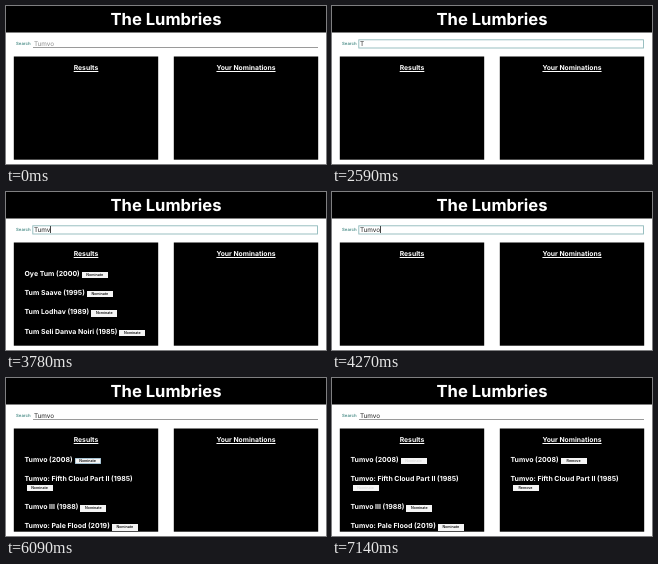
Animation of 320 by 158 pixels, one loop 8 s. Source, as an HTML page:

```html
<!DOCTYPE html>
<html lang="en">
<head>
<meta charset="utf-8">
<title>Nominations</title>
<style>
html, body { margin: 0; width: 100%; height: 100%; overflow: hidden; background: #fff; }
body {
  position: relative;
  font: 700 6.95px/8px Inter, "Liberation Sans", sans-serif;
  text-rendering: geometricPrecision;
  white-space: pre;
}
body > *, .panel > *, .field > * { position: absolute; box-sizing: border-box; }
svg { left: 0; top: 0; }
#box { fill: none; stroke: #8fb9bb; stroke-width: .9; }
#line { fill: #9a9a9a; }
header {
  left: 0; top: 0; width: 320px;
  color: #fff; font-size: 16.6px; line-height: 29px; text-align: center;
}
label { left: 10px; top: 34.5px; font-size: 4.3px; font-weight: 600; color: #4b8d88; }
.field {
  left: 27.5px; top: 34px; width: 284px; height: 8px;
  font-size: 6.4px; font-weight: 400; color: #222;
}
.field span { left: .4px; top: 0; }
.field.empty span { color: #8c8c8c; }
.field i { top: 0; width: .8px; height: 7px; background: #444; }
.panel { top: 50.5px; width: 144px; height: 103px; color: #fff; }
h2 {
  left: 0; top: 7.5px; width: 100%; margin: 0;
  font: inherit; font-size: 6.8px; text-align: center;
  text-decoration: underline; text-decoration-thickness: .7px; text-underline-offset: 1px;
}
.row { position: absolute; left: 10.5px; }
button {
  position: absolute; box-sizing: border-box; width: 26px; height: 6.5px;
  margin: 0; padding: 0; border: 0; background: #f5f5f5; color: #111;
  font: 600 3.6px/6.5px Inter, "Liberation Sans", sans-serif; text-align: center;
}
button:disabled { color: #d8d8d8; }
button.hot { box-shadow: inset 0 0 0 .7px #8fb4c8; }
</style>
</head>
<body>
<svg width="320" height="158">
  <rect width="320" height="26.5"/>
  <rect x="7.8" y="50.5" width="144.4" height="103.2"/>
  <rect x="167.8" y="50.5" width="144.4" height="103.2"/>
  <rect id="line" x="27" y="41" width="285" height="1"/>
  <rect id="box" x="26.8" y="33.8" width="284.7" height="8.2"/>
</svg>
<header>The Lumbries</header>
<label>Search</label>
<div class="field"><span></span><i></i></div>
<div class="panel" style="left:8px"><h2>Results</h2><div id="results"></div></div>
<div class="panel" style="left:168px"><h2>Your Nominations</h2><div id="picks"></div></div>
<script>
const LOOP = 8000, TOP = 27, PITCH = 19.4, WRAP = 8.7;
const word = "Tumvo";
const keys = [2100, 2730, 3010, 3780, 4270];
const caretOn = [[1190, 1680], [2100, 2590], [2730, 3500], [3780, 4830], [5320, 5880]];
const focus = [1190, 6090];
const early = ["Oye Tum (2000)", "Tum Saave (1995)", "Tum Lodhav (1989)", "Tum Seli Danva Noiri (1985)"];
const late = ["Tumvo (2008)", "Tumvo: Fifth Cloud Part II (1985)", "Tumvo III (1988)", "Tumvo: Pale Flood (2019)"];
// press and confirm times of the first two results
const clicks = [[6090, 6160], [7000, 7140]];

const byId = id => document.getElementById(id);
const field = document.querySelector(".field");
const text = field.querySelector("span");
const caret = field.querySelector("i");
const shown = {};

const within = (t, [a, b]) => t >= a && t < b;
const show = (el, on) => { el.style.display = on ? "" : "none"; };

function fill(id, titles, label, t) {
  const state = titles.map((title, i) => {
    const click = id === "results" && titles === late && clicks[i];
    return { title, off: !!click && t >= click[1], hot: !!click && within(t, click) };
  });
  const key = JSON.stringify(state);
  if (shown[id] === key) return;
  shown[id] = key;
  const list = byId(id);
  list.textContent = "";
  let y = TOP;
  for (const { title, off, hot } of state) {
    const drop = title === late[1] ? WRAP : 0;
    const row = document.createElement("div");
    row.className = "row";
    row.style.top = y + "px";
    row.textContent = title;
    const button = document.createElement("button");
    button.textContent = label;
    button.disabled = off;
    button.classList.toggle("hot", hot);
    button.style.left = drop ? "2px" : "calc(100% + 2px)";
    button.style.top = 2 + drop - (drop && 1) + "px";
    row.append(button);
    list.append(row);
    y += PITCH + drop;
  }
}

function draw(t) {
  const typed = word.slice(0, keys.filter(k => t >= k).length);
  const focused = within(t, focus);
  text.textContent = typed || word;
  field.classList.toggle("empty", !typed);
  show(byId("box"), focused);
  show(byId("line"), !focused);
  show(caret, caretOn.some(span => within(t, span)));
  caret.style.left = (typed ? text.getBoundingClientRect().width : 0) + "px";

  const found = within(t, [3150, 3920]) ? early : t >= 4410 ? late : [];
  fill("results", found, "Nominate", t);
  fill("picks", late.filter((_, i) => clicks[i] && t >= clicks[i][1]), "Remove", t);
}

const start = performance.now();
function tick() {
  draw((performance.now() - start) % LOOP);
  requestAnimationFrame(tick);
}
draw(0);
requestAnimationFrame(tick);
</script>
</body>
</html>
```
